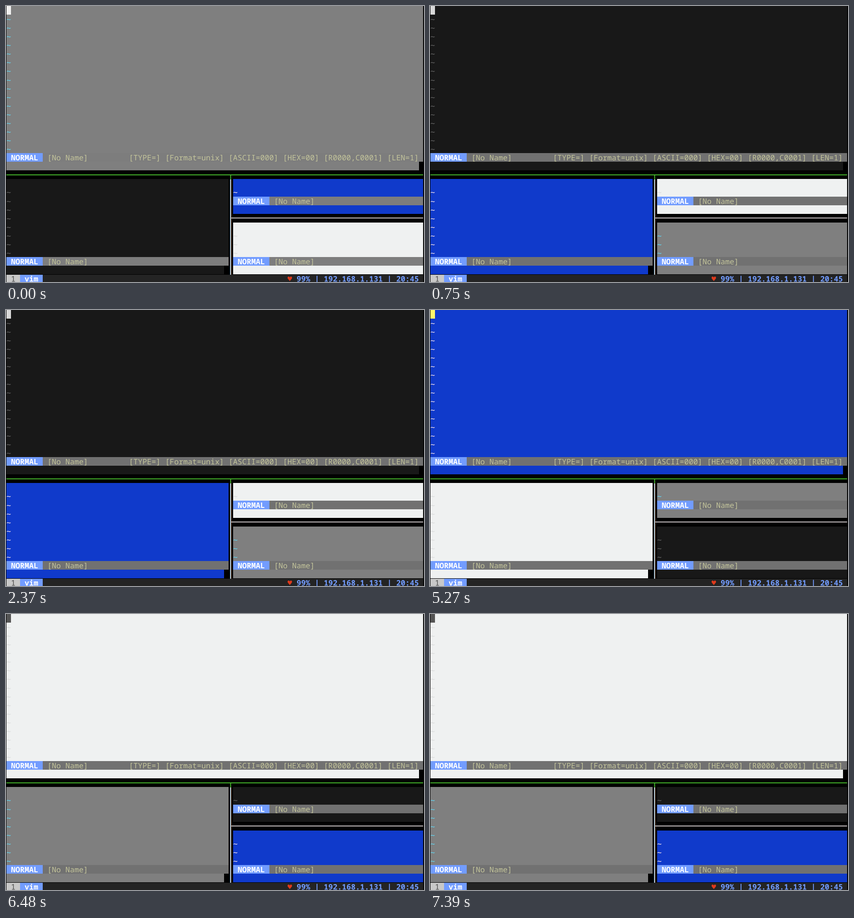
Animation of 922 by 608 pixels, one loop 8 s. Source, as an HTML page:

```html
<!DOCTYPE html>
<html lang="en">
<head>
<meta charset="utf-8">
<title>Terminal panes</title>
<style>
html, body { margin: 0; width: 100%; height: 100%; overflow: hidden; background: #000; }
svg { display: block; width: 922px; height: 608px; }
text { font: 16.667px "Noto Sans Mono", monospace; white-space: pre; text-rendering: geometricPrecision; }
.b { font-weight: 700; }
.m { font-weight: 600; }
.t { font: 16.6px "DejaVu Sans Mono", monospace; }
</style>
</head>
<body>
<svg id="stage" viewBox="0 0 922 608"></svg>
<script>
const NS = 'http://www.w3.org/2000/svg';
const stage = document.getElementById('stage');
const BLUE = '#729cff', KHAKI = '#c3c49b', GREEN = '#45b52b';
const LOOP = 8000, STEPS = [750, 3450, 6480];

const THEMES = [
  { bg: '#7f7f7f', tilde: '#62d6f2', cursor: '#f1f1f1' },
  { bg: '#181818', tilde: '#666666', cursor: '#d9d9d9' },
  { bg: '#103acb', tilde: '#ffe9ec', cursor: '#fff76b' },
  { bg: '#eff1f1', tilde: '#d9dada', cursor: '#555555' }
];

// Terminal cell grid
const col = c => 1 + c * 10;
const row = r => Math.round(r * 19.07);

function add(tag, attrs, content) {
  const el = document.createElementNS(NS, tag);
  for (const k in attrs) el.setAttribute(k, attrs[k]);
  if (content) el.textContent = content;
  stage.appendChild(el);
  return el;
}
const box = (x, y, x2, y2, fill) =>
  add('rect', { x, y, width: x2 - x, height: y2 - y, fill });
const label = (c, r, s, fill, cls = '') =>
  add('text', { x: col(c), y: row(r) + 16, fill, class: cls }, s);

// A vim window: columns, first row, status row, first tilde row, end of command line
function pane(c, right, top, status, firstTilde, cmdRight, shift) {
  const x = col(c);
  const fills = [
    box(x, row(top), right, row(status), '#000'),
    box(x, row(status + 1), cmdRight, row(status + 2), '#000')
  ];
  const bar = box(x, row(status), right, row(status + 1), '#707070');
  box(x, row(status), x + 80, row(status + 1), BLUE);
  label(c + 1, status, 'NORMAL', '#fff', 'b');
  label(c + 9, status, '[No Name]', KHAKI);
  const tildes = [];
  for (let r = firstTilde; r < status; r++) tildes.push(label(c, r, '~', '#000', 't'));
  return { fills, bar, tildes, shift };
}

box(0, 0, 922, 608, '#000');
const panes = [
  pane(0, 920, 0, 17, 1, 911, 0),
  pane(0, 491, 20, 29, 21, 481, 1),
  pane(50, 920, 20, 22, 21, 920, 2),
  pane(50, 920, 25, 29, 26, 920, 3)
];
label(27, 17, '[TYPE=] [Format=unix] [ASCII=000] [HEX=00] [R0000,C0001] [LEN=1]', KHAKI);
const cursor = box(1, 0, 11, 19, '#fff');

// Pane borders
box(494, 382, 495, 592, '#5b9cc4');
box(495, 382, 496, 592, '#e4e4e4');
box(496, 382, 497, 592, '#93705a');
box(497, 466, 920, 468, '#c9c2c4');
box(1, 371, 920, 373, GREEN);
box(494.5, 373, 496.5, 382, GREEN);

// Bottom bar
box(1, 592, 920, 608, '#242424');
box(1, 592, 31, 608, '#c8c8c8');
box(31, 592, 81, 608, BLUE);
label(1, 31, '1', '#4a4a4a');
label(4, 31, 'vim', '#fff', 'm');
label(62, 31, '♥', '#e03a1c', 't');
label(64, 31, '99% | 192.168.1.131 | 20:45', BLUE, 'm');

let shown = -1;
function draw(ms) {
  const step = STEPS.filter(t => ms >= t).length;
  if (step === shown) return;
  shown = step;
  for (const p of panes) {
    const theme = THEMES[(step + p.shift) % 4];
    p.fills.forEach(el => el.setAttribute('fill', theme.bg));
    p.tildes.forEach(el => el.setAttribute('fill', theme.tilde));
    p.bar.setAttribute('fill', step ? '#717171' : '#7d7d7d');
  }
  cursor.setAttribute('fill', THEMES[step].cursor);
}

const start = performance.now();
function tick() {
  draw((performance.now() - start) % LOOP);
  requestAnimationFrame(tick);
}
draw(0);
requestAnimationFrame(tick);
</script>
</body>
</html>
```
